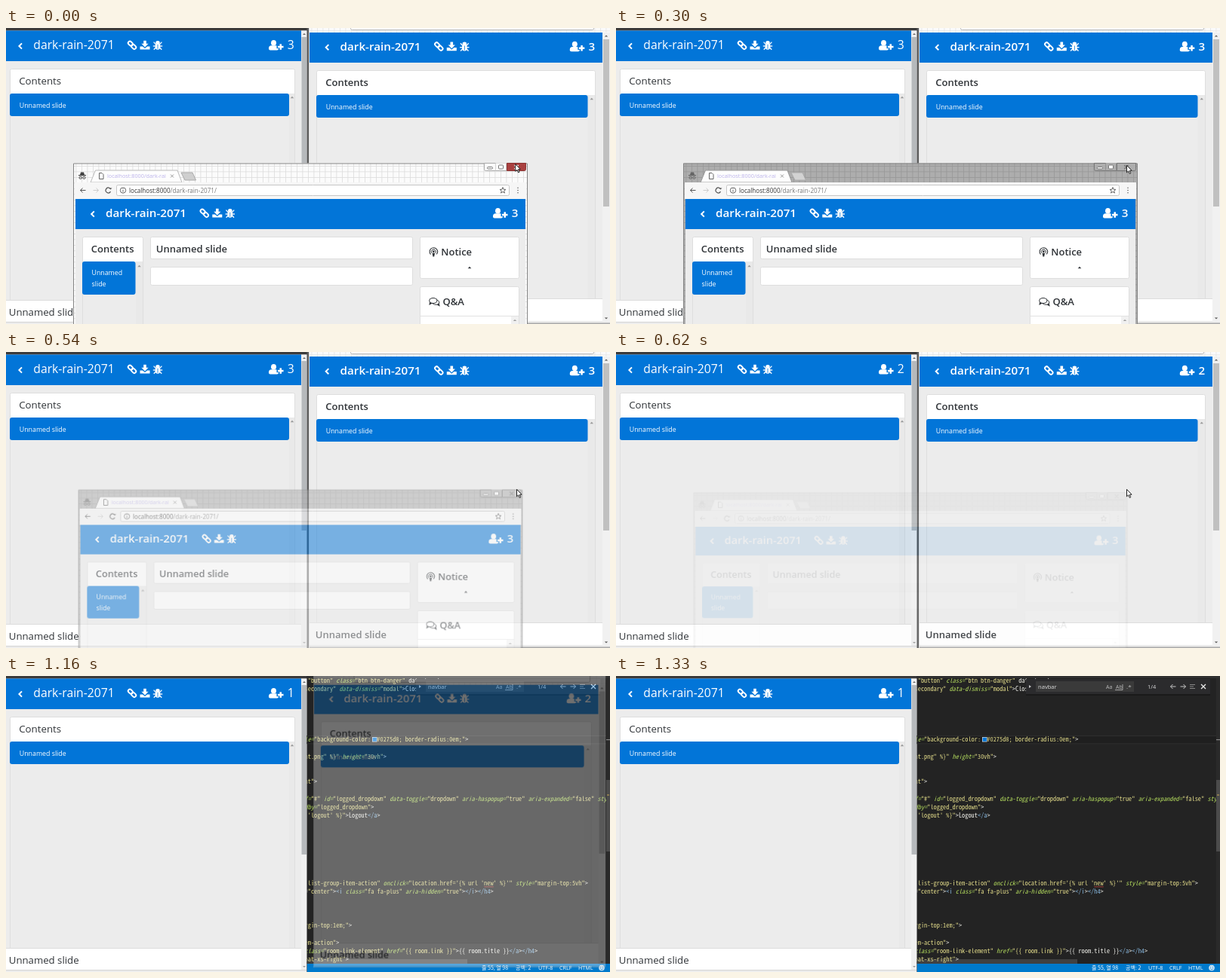
Write an HTML page with a canvas that moves like this. It is 800 px wide and 393 px high and loops after 1.56 s.

```html
<!DOCTYPE html>
<html lang="en">
<head>
<meta charset="utf-8">
<title>Closing windows</title>
<style>
  html, body { margin: 0; width: 100%; height: 100%; overflow: hidden; background: #ebebeb; }
  canvas { display: block; width: 100vw; height: 100vh; }
</style>
</head>
<body>
<canvas id="stage"></canvas>
<script>
const W = 800, H = 393, PAD = 60, LOOP = 1560;
const DPR = window.devicePixelRatio || 1;
const UI = '"Open Sans", "Noto Sans", sans-serif';
const MONO = '"Noto Sans Mono CJK KR", "Noto Sans Mono", "DejaVu Sans Mono", monospace';
const BLUE = '#0275d8', PAGE = '#ececec', INK = '#303438';

function makeCanvas(el, w, h) {
  el.width = w * DPR;
  el.height = h * DPR;
  return el.getContext('2d');
}
const stage = makeCanvas(document.getElementById('stage'), W, H);
const layer = makeCanvas(document.createElement('canvas'), W + 2 * PAD, H + 2 * PAD);
let g = stage;

// ---------- drawing helpers ----------
function rect(x, y, w, h, fill) {
  g.fillStyle = fill;
  g.fillRect(x, y, w, h);
}
function round(x, y, w, h, r, fill, stroke) {
  g.beginPath();
  g.roundRect(x, y, w, h, r);
  if (fill) { g.fillStyle = fill; g.fill(); }
  if (stroke) { g.lineWidth = 1; g.strokeStyle = stroke; g.stroke(); }
}
function poly(points, fill, stroke) {
  g.beginPath();
  points.forEach(([x, y], i) => i ? g.lineTo(x, y) : g.moveTo(x, y));
  g.closePath();
  if (fill) { g.fillStyle = fill; g.fill(); }
  if (stroke) { g.lineWidth = 1; g.strokeStyle = stroke; g.stroke(); }
}
function line(points, color, width = 1) {
  g.beginPath();
  points.forEach(([x, y], i) => i ? g.lineTo(x, y) : g.moveTo(x, y));
  g.lineWidth = width;
  g.strokeStyle = color;
  g.stroke();
}
function disc(x, y, rx, ry, fill) {
  g.beginPath();
  g.ellipse(x, y, rx, ry, 0, 0, 2 * Math.PI);
  g.fillStyle = fill;
  g.fill();
}
function ring(x, y, r, color, width = 1, from = 0, to = 2 * Math.PI) {
  g.beginPath();
  g.arc(x, y, r, from, to);
  g.lineWidth = width;
  g.strokeStyle = color;
  g.stroke();
}
function text(str, x, y, size, color = INK, weight = 400, family = UI) {
  g.font = `${weight} ${size}px ${family}`;
  g.fillStyle = color;
  g.fillText(str, x, y);
}
function tri(x, y, s, color, dir = -1) {
  poly([[x - s, y - dir * s / 2], [x + s, y - dir * s / 2], [x, y + dir * s / 2]], color);
}
function cross(x, y, s, color, width = 1) {
  line([[x - s, y - s], [x + s, y + s]], color, width);
  line([[x - s, y + s], [x + s, y - s]], color, width);
}
function arrow(x, y, dir, color, s = 3.5) {
  line([[x - s, y], [x + s, y]], color);
  line([[x + dir * (s - 3), y - 3], [x + dir * s, y], [x + dir * (s - 3), y + 3]], color);
}
function grid(x, y, w, h, bg, ink) {
  rect(x, y, w, h, bg);
  g.save();
  g.beginPath();
  g.rect(x, y, w, h);
  g.clip();
  for (let i = 3.5; i < w; i += 7.5) rect(x + i, y, 0.8, h, ink);
  for (let j = 3.5; j < h; j += 7.5) rect(x, y + j, w, 0.8, ink);
  g.restore();
}

// ---------- header icons ----------
function linkIcon(x, y) {
  g.save();
  g.translate(x, y);
  g.rotate(Math.PI / 4);
  g.strokeStyle = '#fff';
  g.lineWidth = 1.9;
  for (const dx of [-6.4, -0.4]) {
    g.beginPath();
    g.roundRect(dx, -2.3, 6.8, 4.6, 2.2);
    g.stroke();
  }
  g.restore();
}
function downloadIcon(x, y) {
  rect(x - 1.8, y - 6, 3.6, 4.5, '#fff');
  poly([[x - 4.6, y - 2], [x + 4.6, y - 2], [x, y + 2.8]], '#fff');
  poly([[x - 6.5, y + 1.6], [x - 3, y + 1.6], [x, y + 4.2], [x + 3, y + 1.6],
        [x + 6.5, y + 1.6], [x + 6.5, y + 5.8], [x - 6.5, y + 5.8]], '#fff');
}
function bugIcon(x, y) {
  disc(x, y - 3.6, 2.7, 2.3, '#fff');
  disc(x, y + 1.4, 3.4, 4.6, '#fff');
  for (const s of [-1, 1]) {
    line([[x + s * 5.4, y - 4.2], [x + s * 2.6, y - 1.2]], '#fff', 1.3);
    line([[x + s * 6.2, y + 1.2], [x, y + 1.2]], '#fff', 1.3);
    line([[x + s * 5.2, y + 6], [x + s * 2.4, y + 3]], '#fff', 1.3);
  }
  rect(x - 0.4, y - 1, 0.8, 6, BLUE);
}
function userIcon(x, y) {
  disc(x + 6.5, y - 3.2, 3.5, 3.8, '#fff');
  round(x, y + 0.2, 13, 6.3, [3.5, 3.5, 2, 2], '#fff');
  rect(x + 10.5, y - 0.2, 9, 4.4, BLUE);
  rect(x + 12, y + 0.8, 7.5, 2.5, '#fff');
  rect(x + 14.5, y - 1.7, 2.5, 7.5, '#fff');
}
function header(x, y, userX, count, weight) {
  const size = weight > 400 ? 15.2 : 15.7;
  line([[x + 21, y - 3.6], [x + 17.4, y], [x + 21, y + 3.6]], '#fff', 2);
  text('dark-rain-2071', x + 36.3, y + 4.4, size, '#fff', weight);
  linkIcon(x + 167, y - 1.2);
  downloadIcon(x + 184, y - 1.2);
  bugIcon(x + 201, y - 1.2);
  userIcon(userX, y - 1);
  text(count, userX + 24.7, y + 4.4, size, '#fff', weight);
}

// ---------- page parts ----------
function card(x, y, w, h) {
  round(x + 0.5, y + 0.5, w - 1, h - 1, 2, '#fff', '#dedede');
}
function contents(x, y, w, bottom, bar, weight) {
  card(x, y, w, bottom - y + 8);
  rect(x + 1, y + 33, w - 2, bottom - y - 33, PAGE);
  rect(x + w - bar, y + 33, bar - 1, bottom - y - 33, '#e9e9e9');
  text('Contents', x + 12.2, y + 21, weight > 400 ? 13 : 13.3, INK, weight);
  round(x, y + 33, w - bar, 30, 3, BLUE);
  text('Unnamed slide', x + 12.8, y + 52, 8.8, '#fff');
  tri(x + w - bar / 2, y + 38, 2.3, '#999');
}
function leftWindow(count) {
  rect(0, 0, 399, H, PAGE);
  rect(0, 0, 399, 3.5, '#3b3b3b');
  rect(0, 3.5, 391, 40.5, BLUE);
  header(0, 24, 348, count, 400);
  contents(5, 54, 378, 362, 8, 400);
  rect(0, 361, 391, 29, '#fff');
  rect(0, 361, 391, 1, '#dcdcdc');
  text('Unnamed slide', 3.8, 382, 13.2);
  rect(0, 390, 399, 1, '#d4d4d4');
  rect(391, 3.5, 7.5, 386.5, '#f0f0f0');
  rect(391.5, 12, 6.5, 225, '#b6b9bc');
  tri(395, 8, 2, '#666');
  tri(395, 386, 2, '#999', 1);
}
function rightWindow(count) {
  rect(401, -50, 399, H + 50, PAGE);
  grid(401, -45, 399, 51, '#fafafa', '#e4e4e4');
  round(456.5, -12.5, 322, 15, 2, '#fff', '#b8b8b8');
  rect(402, 6, 388, 40, BLUE);
  header(406.3, 25.7, 746.8, count, 600);
  contents(411, 56, 370, 360, 10.5, 600);
  rect(402, 359, 388, 30, '#fff');
  rect(402, 359, 388, 1, '#dcdcdc');
  text('Unnamed slide', 409.8, 380, 13, INK, 600);
  rect(401, 391.5, 399, 1.5, '#aaa');
  rect(790, 6, 10, 384, '#f1f1f1');
  rect(791, 15, 8, 222, '#c0c0c0');
  tri(795, 10.5, 2.2, '#555');
  tri(795, 385.5, 2.2, '#555', 1);
  rect(401, 0, 1, H, '#ddd');
}

// ---------- browser popup ----------
function hatIcon(x, y, color) {
  poly([[x - 3, y - 1], [x - 2, y - 4.5], [x + 2, y - 4.5], [x + 3, y - 1]], color);
  rect(x - 5, y - 1, 10, 1.2, color);
  ring(x - 2.4, y + 2.8, 1.6, color);
  ring(x + 2.4, y + 2.8, 1.6, color);
}
function titleBar(active) {
  const bg = active ? '#fbfbfb' : '#adadad', ink = active ? '#dcdcdc' : '#989898';
  const edge = active ? '#aaa' : '#777';
  grid(89, 179.5, 601.5, 270, bg, ink);
  line([[89.5, 450], [89.5, 180], [690.5, 180], [690.5, 450]], '#858585');
  hatIcon(101, 196, active ? '#444' : '#666');
  poly([[112, 205], [118.5, 189], [227, 189], [233, 205]], '#fdfdfd', active ? '#bbb' : '#999');
  poly([[232, 192], [247, 192], [251.5, 202], [237, 202]], active ? '#cfcfcf' : '#d2d2d2', '#aaa');
  poly([[123.5, 192.5], [127, 192.5], [129, 194.5], [129, 200.5], [123.5, 200.5]], '#fff', '#666');
  text('localhost:8000/dark-rai', 134, 199.3, 7.25, '#bbb2ea');
  cross(220, 196.5, 2, '#999');
  round(633.5, 179.5, 15, 10, [0, 0, 0, 2], bg, edge);
  rect(648.5, 179.5, 14.5, 10, bg);
  line([[648.5, 189.5], [663, 189.5], [663, 180]], edge);
  round(663.5, 179.5, 25, 10, [0, 0, 2, 0], active ? '#a9403f' : bg, active ? '#8a3433' : edge);
  round(637.5, 184.5, 7, 2.5, 1, '#fff', '#777');
  round(652.5, 182, 6, 5, 1, '#fff', '#777');
  cross(676, 184.7, 2.6, active ? '#fff' : '#777', 1.5);
}
function toolBar() {
  rect(91, 205, 598, 22, '#f6f6f6');
  arrow(102, 215.5, -1, '#555');
  arrow(119, 215.5, 1, '#ccc');
  ring(135.5, 215.5, 3.4, '#555', 1.2, 0.5, 5.6);
  tri(138.5, 213.6, 2, '#555', 1);
  round(146.5, 208.5, 520, 14, 2, '#fff', '#c6c6c6');
  ring(155, 215.5, 3.7, '#666');
  rect(154.5, 215, 1, 2.6, '#666');
  rect(154.5, 213, 1, 1, '#666');
  text('localhost:8000', 163, 218.6, 8.1, '#333');
  const hostWidth = g.measureText('localhost:8000').width;
  text('/dark-rain-2071/', 163 + hostWidth, 218.6, 8.1, '#777');
  const star = Array.from({ length: 10 }, (_, i) => {
    const r = i % 2 ? 1.8 : 4.2, a = Math.PI * (i / 5 - 0.5);
    return [658 + r * Math.cos(a), 215.7 + r * Math.sin(a)];
  });
  poly(star, null, '#666');
  for (const y of [212.3, 215.5, 218.7]) disc(678, y, 0.8, 0.8, '#666');
}
function noticeIcon(x, y) {
  ring(x, y - 0.5, 5.2, INK, 1.1, 2.4, 7);
  ring(x, y - 0.5, 3, INK, 1, 2.5, 6.9);
  disc(x, y - 0.5, 1.4, 1.4, INK);
  poly([[x - 1.7, y + 1.6], [x + 1.7, y + 1.6], [x + 0.9, y + 6], [x - 0.9, y + 6]], INK);
}
function chatIcon(x, y) {
  const bubble = (cx, cy, rx, ry, tail) => {
    poly([[cx + tail * 4.5, cy + 1], [cx + tail * 5.5, cy + ry + 2], [cx + tail, cy + ry - 0.5]], INK);
    disc(cx, cy, rx, ry, INK);
    disc(cx, cy, rx - 1, ry - 1, '#fff');
  };
  bubble(x + 2.2, y + 1.2, 5, 3.6, 1);
  bubble(x - 1.2, y - 1, 5.6, 4, -1);
}
function popup(active) {
  titleBar(active);
  toolBar();
  rect(92, 227, 596, 223, PAGE);
  rect(92, 227, 596, 40, BLUE);
  header(95.8, 247, 645, '3', 600);

  card(101, 277, 81, 180);
  rect(102, 310, 79, 140, PAGE);
  text('Contents', 112.8, 298, 13, INK, 600);
  round(101, 310, 70.5, 44, 3, BLUE);
  text('Unnamed', 113.5, 328.3, 8.8, '#fff');
  text('slide', 113.5, 342.5, 8.8, '#fff');
  rect(172, 310, 9, 140, '#e9e9e9');
  tri(176.5, 316, 2.3, '#999');

  card(191, 277, 348, 30);
  text('Unnamed slide', 198.8, 298, 13, INK, 600);
  card(191, 317, 348, 25);

  card(548, 277, 132, 56);
  noticeIcon(566.3, 297.5);
  text('Notice', 576.3, 302.3, 13, INK, 600);
  tri(614, 318, 2.3, INK);
  card(548, 343, 132, 100);
  chatIcon(567, 363);
  text('Q&A', 578.5, 368, 13, INK, 600);
  rect(549, 382, 130, 1, '#e2e2e2');
  rect(669, 383, 10, 60, '#f0f0f0');
  tri(674, 388, 2.2, '#999');
}

// ---------- code editor ----------
const PITCH = 4.17, ROW = 11.22, CODE_X = 391.4;
g.font = `100px ${MONO}`;
const CODE_SIZE = PITCH * 100 / g.measureText('0').width;

// row, column, starts inside a string, code
const CODE = [
  [0, 2, 0, '"button" class="btn btn-danger" data-toggle'],
  [1, 1, 1, 'secondary" data-dismiss="modal">Close</a>'],
  [7, 0, 0, 'yle="background-color:  #0275d8; border-radius:0em;">'],
  [9, 1, 1, 'nt.png" %}" height="30vh">'],
  [12, 1, 1, 'nt">'],
  [14, 1, 0, 'f="#" id="logged_dropdown" data-toggle="dropdown" aria-haspopup="true" aria-expanded="false" style='],
  [15, 1, 0, 'dby="logged_dropdown">'],
  [16, 2, 1, '\'logout\' %}">Logout</a>'],
  [24, 0, 1, 'm list-group-item-action" onclick="location.href=\'{% url \'new\' %}\'" style="margin-top:5vh">'],
  [25, 1, 0, '="center"><i class="fa fa-plus" aria-hidden="true"></i></h4>'],
  [29, 1, 1, 'rgin-top:1em;">'],
  [31, 1, 1, 'em-action">'],
  [32, 1, 0, 'class="room-link-element" href="{{ room.link }}">{{ room.title }}</a></h4>'],
  [33, 1, 1, 'oat-xs-right">']
];
const STRING = '#e3dc8a', ATTR = '#b4dc5e', TAG = '#86b6dd', PLAIN = '#f4f4ee';

function tokens(code, inString) {
  const out = [];
  let at = 0;
  const add = (str, color, style) => {
    out.push({ str, at, color, style });
    at += str.length;
  };
  code.split(/("(?! %))/).forEach(part => {
    if (part === '"') {
      add(part, STRING);
      inString = !inString;
    } else if (inString) {
      add(part, STRING);
    } else {
      for (const [word] of part.matchAll(/<\/?\w+|[\w-]+=|[^<\w]+|\w+|</g)) {
        if (word[0] === '<') add(word, TAG);
        else if (/\w=$/.test(word)) add(word, ATTR, 'italic');
        else add(word, PLAIN);
      }
    }
  });
  return out;
}
const TOKENS = CODE.flatMap(([row, col, inString, code]) =>
  tokens(code, !!inString).map(t => ({ ...t, row, col: col + t.at })));

function findBox() {
  const soft = '#c8c8c8';
  rect(543, 4, 244, 22, '#1a1a1a');
  rect(543, 4, 244, 20, '#2b2b2d');
  poly([[547, 12], [550, 14, 0], [547, 16]], soft);
  rect(556, 7, 130, 14, '#3a3a3a');
  text('navbar', 559, 17.3, 7.6, '#ddd');
  text('Aa', 649, 17, 7, '#bbb');
  text('Ab', 662, 16.5, 7, '#bbb');
  line([[661, 18.5], [671, 18.5], [671, 11]], '#bbb', 0.8);
  text('.*', 676, 17, 8, '#bbb');
  text('1/4', 704, 17, 7.4, '#ddd');
  arrow(738, 14, -1, soft);
  arrow(751, 14, 1, soft);
  for (const [y, w] of [[11, 7], [13.5, 5], [16, 7]]) rect(760, y, w, 1, '#888');
  cross(778, 14, 3, '#eee', 1.3);
}
function statusBar() {
  rect(398.5, 382, 402, 11, '#007acc');
  const korean = '"Noto Sans CJK KR", "Noto Sans CJK", sans-serif';
  text('줄 55, 열 98', 630, 390.2, 7, '#fff', 400, korean);
  text('공백: 2', 675, 390.2, 7, '#fff', 400, korean);
  text('UTF-8', 705, 390.2, 7.2, '#fff');
  text('CRLF', 733, 390.2, 7.2, '#fff');
  text('HTML', 758, 390.2, 7.2, '#fff');
  disc(789, 387.5, 3.8, 3.8, '#cfe6f6');
  disc(787.6, 386.5, 0.6, 0.6, '#007acc');
  disc(790.4, 386.5, 0.6, 0.6, '#007acc');
  ring(789, 387.5, 2.1, '#007acc', 0.7, 0.3, 2.8);
}
function editor() {
  g.save();
  g.beginPath();
  g.rect(398.5, 0, 402, H);
  g.clip();
  rect(398, 0, 402, H, '#232323');
  rect(398, 79, 397, 11, '#1f1f1f');
  rect(398, 79, 397, 0.8, '#333');
  rect(398, 89.5, 397, 0.8, '#333');
  rect(398, 376, 213, 6, '#414141');
  for (const { str, row, col, color, style } of TOKENS) {
    g.font = `${style || 'normal'} ${CODE_SIZE}px ${MONO}`;
    g.fillStyle = color;
    g.fillText(str, CODE_X + col * PITCH, 8.8 + row * ROW);
  }
  rect(485, 81, 6.5, 6.5, '#ddd');
  rect(485.7, 81.7, 5.1, 5.1, BLUE);
  rect(CODE_X + 58 * PITCH, 279.5, 3 * PITCH, 0.8, '#c0453c');
  rect(398, 0, 402, 3, '#303030');
  rect(795, 3, 5, 379, '#2a2a2a');
  rect(795, 138, 5, 95, '#4b4b4b');
  rect(795, 84, 5, 1.2, '#888');
  rect(796, 157, 3, 2, '#8a7a50');
  findBox();
  statusBar();
  g.restore();
}

// ---------- scene ----------
function pointer(x, y) {
  const shape = [[0, 0], [0, 9.6], [2.2, 7.6], [3.8, 11.2], [5.3, 10.5], [3.8, 7.1], [6.6, 6.9]];
  poly(shape.map(([dx, dy]) => [x + dx, y + dy]), '#fff', '#222');
}

// Draws a window as one flat sheet, shrunk about (cx, cy) and faded.
function faded(draw, cx, cy, scale, alpha) {
  g = layer;
  g.setTransform(DPR, 0, 0, DPR, 0, 0);
  g.clearRect(0, 0, W + 2 * PAD, H + 2 * PAD);
  g.translate(PAD, PAD);
  draw();
  g = stage;
  g.save();
  g.globalAlpha = alpha;
  g.translate(cx, cy);
  g.scale(scale, scale);
  g.drawImage(layer.canvas, -cx - PAD, -cy - PAD, W + 2 * PAD, H + 2 * PAD);
  g.restore();
}

function scene(t) {
  g.setTransform(DPR, 0, 0, DPR, 0, 0);
  const count = t < 620 ? '3' : '2';
  leftWindow(t < 1160 ? count : '1');

  if (t < 1160) {
    rect(398.5, 0, 3, H, '#5a5a5a');
    rightWindow(count);
  } else {
    editor();
    if (t < 1330) {
      const [scale, alpha] = t < 1240 ? [0.97, 0.35] : [0.955, 0.07];
      faded(() => rightWindow('2'), 606, 197, scale, alpha);
    }
  }

  if (t < 540) {
    popup(t < 300);
  } else if (t < 690) {
    const [scale, alpha] = t < 620 ? [0.978, 0.5] : [0.955, 0.1];
    faded(() => popup(false), 390, 338, scale, alpha);
  }
  if (t < 160) pointer(674.7, 180.7);
  else if (t < 770) pointer(676.5, 182.3);
}

function tick() {
  scene(performance.now() % LOOP);
  requestAnimationFrame(tick);
}
tick();
</script>
</body>
</html>
```
